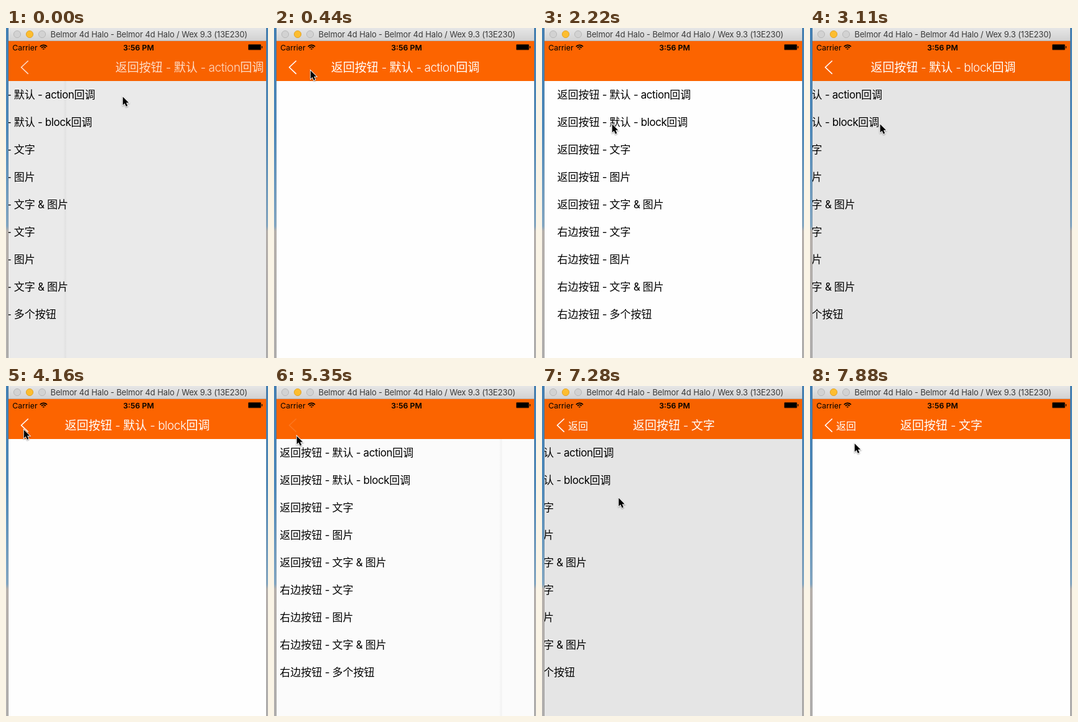
Recreate the animation shown at these times as an HTML page with a canvas. Size 421 px wide and 529 px high, loop 8 s.

```html
<!DOCTYPE html>
<html lang="zh">
<head>
<meta charset="utf-8">
<title>Navigation bar demo</title>
<style>
  html, body { margin: 0; width: 421px; height: 529px; overflow: hidden; background: #fefefe; }
  canvas { display: block; width: 421px; height: 529px; }
</style>
</head>
<body>
<canvas id="stage"></canvas>
<script>
const W = 421, H = 529, LOOP = 8000, TICK = 148.67;
const LEFT = 4, WIDTH = 414, TOP = 21, BAR = 85;
const FONTS = 'Inter, "Noto Sans CJK SC", "Noto Sans CJK", "Noto Sans CJK JP", sans-serif';

const BACK = '返回按钮', RIGHT = '右边按钮';
const ROWS = [
  ...['默认 - action回调', '默认 - block回调', '文字', '图片', '文字 & 图片'].map(s => `${BACK} - ${s}`),
  ...['文字', '图片', '文字 & 图片', '多个按钮'].map(s => `${RIGHT} - ${s}`)
];

const MOVES = [
  { start: -157, push: true, row: 0 },
  { start: 1560, push: false, row: 0 },
  { start: 2740, push: true, row: 1 },
  { start: 5150, push: false, row: 1 },
  { start: 6820, push: true, row: 2, label: '返回' }
];

// Pointer strokes after the first position: start, end, x, y
const HOME = [187, 109.5];
const STROKES = [
  [0, 446, 58, 67.5], [446, 740, 33, 64], [1040, 1338, 33, 66], [1630, 2220, 112, 153.5],
  [3410, 4160, 28, 69.5], [5200, 6100, 132, 200], [6100, 6244, 133, 196.5], [7075, 7880, 71, 91.5]
];

const canvas = document.getElementById('stage');
const ctx = canvas.getContext('2d');
const dpr = window.devicePixelRatio || 1;
canvas.width = W * dpr;
canvas.height = H * dpr;
ctx.scale(dpr, dpr);

const clamp = u => Math.min(1, Math.max(0, u));
const smooth = u => u * u * (3 - 2 * u);
const spring = s => s >= 0.5 ? 1 : 1 - (1 + 18 * s) * Math.exp(-18 * s);

// The screen refreshes at a fixed pace
const refreshTime = t => Math.floor((t + 15) / TICK) * TICK;

function pointerAt(t) {
  let [x, y] = HOME;
  for (const [start, end, toX, toY] of STROKES) {
    const u = smooth(clamp((t - start) / (end - start)));
    x += (toX - x) * u;
    y += (toY - y) * u;
  }
  return [x, y];
}

function rect(x, y, w, h, fill) {
  ctx.fillStyle = fill;
  ctx.fillRect(x, y, w, h);
}

function gradient(x0, y0, x1, y1, ...stops) {
  const g = ctx.createLinearGradient(x0, y0, x1, y1);
  stops.forEach(([at, color]) => g.addColorStop(at, color));
  return g;
}

// Latin runs are set a little tighter than the Chinese ones
function text(str, x, y, { size = 17, weight = 400, fill = '#000', align = 0, track = -0.025 } = {}) {
  ctx.font = `${weight} ${size}px ${FONTS}`;
  ctx.fillStyle = fill;
  const runs = str.match(/[ -~]+|[^ -~]+/g).map(run => {
    const spacing = /[ -~]/.test(run) ? `${track * size}px` : '0px';
    ctx.letterSpacing = spacing;
    return { run, spacing, width: ctx.measureText(run).width };
  });
  x -= align * runs.reduce((sum, r) => sum + r.width, 0);
  for (const { run, spacing, width } of runs) {
    ctx.letterSpacing = spacing;
    ctx.fillText(run, x, y);
    x += width;
  }
}

function drawDesktop() {
  rect(0, 0, W, H, gradient(0, 0, 0, H, [0, '#4582b6'], [0.3, '#4f8abb'], [0.6, '#86a9c4'],
    [0.615, '#b9b3ae'], [1, '#b2b0af']));
  rect(LEFT - 1, 0, WIDTH + 2, H, 'rgba(0,0,0,.12)');
}

function drawWindowBar() {
  rect(LEFT, 0, WIDTH, TOP, gradient(0, 0, 0, TOP, [0, '#e6e6e6'], [1, '#d1d1d1']));
  rect(LEFT, TOP - 1, WIDTH, 1, '#b9b2ad');
  [['#d2d2d2', '#b5b5b5'], ['#fdbd2f', '#dfa023'], ['#d2d2d2', '#b5b5b5']].forEach(([fill, edge], i) => {
    ctx.beginPath();
    ctx.arc(18 + 20 * i, 10, 5.6, 0, 7);
    ctx.fillStyle = fill;
    ctx.fill();
    ctx.strokeStyle = edge;
    ctx.lineWidth = 0.9;
    ctx.stroke();
  });
  text('Belmor 4d Halo - Belmor 4d Halo / Wex 9.3 (13E230)', 229.7, 15,
    { size: 13, fill: '#3a3a3a', align: 0.5, track: -0.01 });
}

function drawStatus() {
  text('Carrier', 10.3, 36, { size: 12.3, track: 0 });
  text('3:56 PM', 213, 36, { size: 12.3, weight: 600, align: 0.5, track: 0 });
  ctx.strokeStyle = '#000';
  ctx.lineWidth = 1.7;
  for (const r of [1.5, 4.6, 7.6]) {
    ctx.beginPath();
    ctx.arc(60.3, 35, r, -Math.PI * 0.76, -Math.PI * 0.24);
    ctx.stroke();
  }
  ctx.fillStyle = 'rgba(0,0,0,.5)';
  ctx.beginPath();
  ctx.roundRect(389, 26, 21, 9.5, 1.6);
  ctx.fill();
  rect(389.7, 26.7, 19.6, 8, '#000');
  rect(410.8, 29, 1.2, 3.5, '#000');
}

function drawList(p) {
  rect(LEFT, BAR, WIDTH, H - BAR, `rgba(0,0,0,${0.1 * p})`);
  const edge = LEFT + WIDTH * (1 - p);
  if (p > 0 && p < 0.99) {
    rect(edge - 6, BAR, 6, H - BAR,
      gradient(edge - 6, 0, edge, 0, [0, 'rgba(0,0,0,0)'], [0.6, 'rgba(0,0,0,.035)'], [1, 'rgba(0,0,0,0)']));
  }
  ROWS.forEach((row, i) => text(row, 24.5 - 124 * p, 113 + 44 * i));
}

function drawNav(p, title, label) {
  ctx.globalAlpha = p;
  ctx.beginPath();
  ctx.moveTo(35.7, 52.5);
  ctx.lineTo(24.6, 63);
  ctx.lineTo(35.7, 73.7);
  ctx.strokeStyle = '#fff';
  ctx.lineWidth = 1.6;
  ctx.stroke();
  const style = { weight: 350, fill: '#fff' };
  if (label) text(label, 42, 69.5, { ...style, size: 16 });
  text(title, 211 + 371 * (1 - p), 69.6, { ...style, size: 19, align: 0.5 });
  ctx.globalAlpha = 1;
}

function drawPointer([x, y]) {
  ctx.save();
  ctx.translate(x, y);
  ctx.scale(0.93, 0.93);
  ctx.beginPath();
  [[0.8, 0.8], [0.8, 15], [4, 12], [6.4, 17.6], [9, 16.5], [6.6, 11.1], [11, 11.1]]
    .forEach(p => ctx.lineTo(...p));
  ctx.closePath();
  ctx.shadowColor = 'rgba(0,0,0,.4)';
  ctx.shadowBlur = 2 * dpr;
  ctx.shadowOffsetY = dpr;
  ctx.strokeStyle = '#fff';
  ctx.lineWidth = 1.9;
  ctx.stroke();
  ctx.shadowColor = 'transparent';
  ctx.fillStyle = '#000';
  ctx.fill();
  ctx.restore();
}

function draw(now) {
  const t = refreshTime(now % LOOP);
  const { start, push, row, label } = MOVES.filter(m => m.start <= t).pop();
  const s = (t - start) / 1000;
  const p = push ? spring(s) : 1 - spring(s);
  const listShown = !push || s < 0.5;

  drawDesktop();
  drawWindowBar();
  ctx.save();
  ctx.beginPath();
  ctx.rect(LEFT, TOP, WIDTH, H);
  ctx.clip();
  rect(LEFT, BAR, WIDTH, H - BAR, '#fefefe');
  if (listShown) drawList(p);
  rect(LEFT, TOP, WIDTH, BAR - TOP, '#fc6400');
  // The bar lets a little of the dimming through
  if (listShown) rect(LEFT, TOP, WIDTH, BAR - TOP, `rgba(0,0,0,${0.02 * p})`);
  drawStatus();
  if (p > 0) drawNav(p, ROWS[row], label);
  ctx.restore();
  drawPointer(pointerAt(t));
}

const begin = performance.now();
function tick() {
  draw(performance.now() - begin);
  requestAnimationFrame(tick);
}
tick();
</script>
</body>
</html>
```
